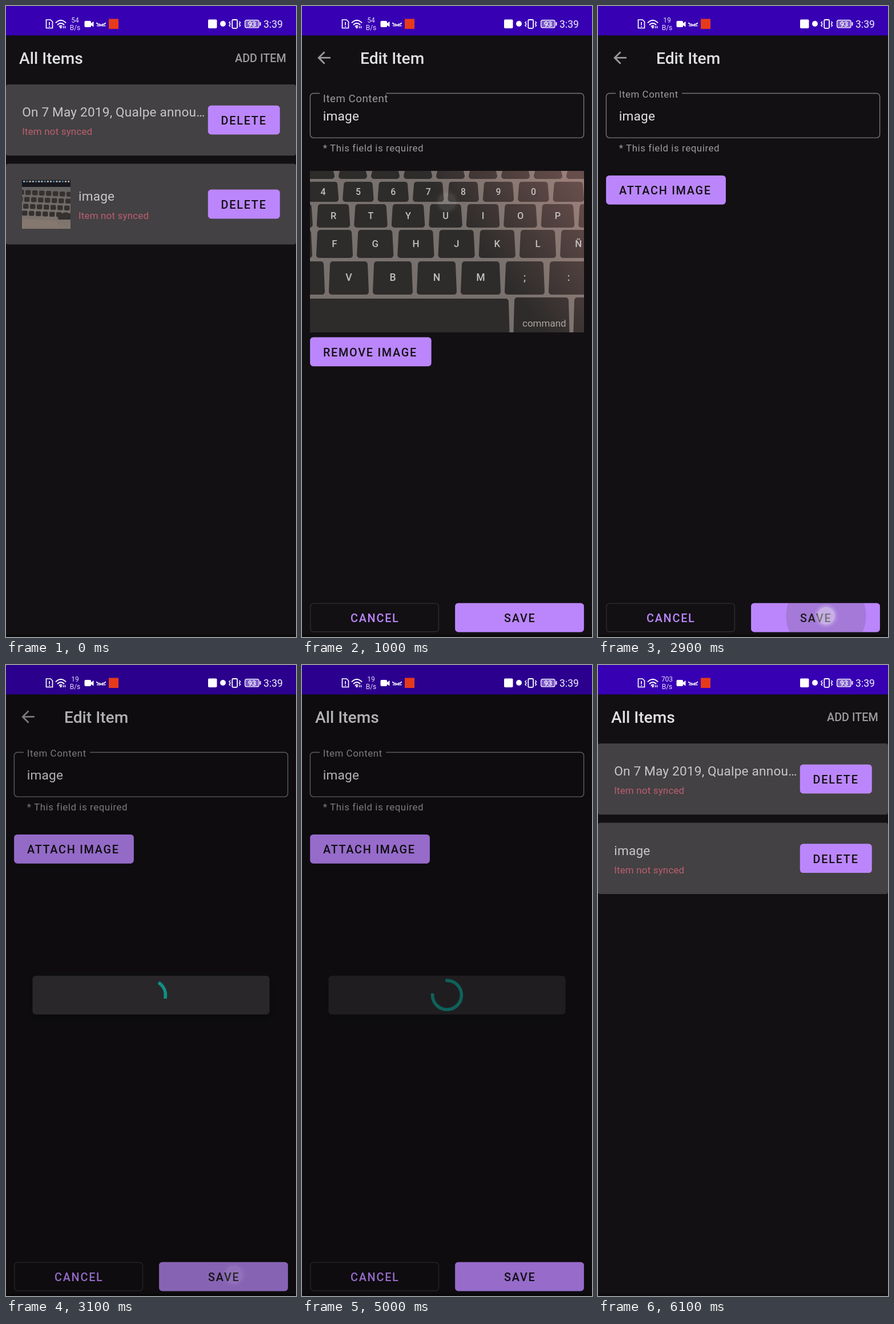
Recreate the animation shown at these times as an HTML page. Size 508 by 1102 pixels, loop 6.4 s.

```html
<!DOCTYPE html>
<html lang="en">
<head>
<meta charset="utf-8">
<title>Item list</title>
<style>
  html, body { margin: 0; width: 100%; height: 100%; overflow: hidden; background: #121013; }
  svg { display: block; width: 100%; height: 100%; }
  text { font-family: Roboto, sans-serif; white-space: pre; }
</style>
</head>
<body>
<svg id="stage" viewBox="0 0 508 1102"></svg>
<script>
const LOOP = 6400, STEP = 100;
const PURPLE = '#bb86fc', BACK = '#121013', MUTED = '#9b9a9c';

// Markup helpers
const rect = (x, y, w, h, fill, r = 0, more = '') =>
  `<rect x="${x}" y="${y}" width="${w}" height="${h}" rx="${r}" fill="${fill}" ${more}/>`;
const text = (x, y, size, fill, str, { weight = 400, gap = 0, anchor = 'start', id = '' } = {}) =>
  `<text ${id && `id="${id}"`} x="${x}" y="${y}" font-size="${size}" fill="${fill}" font-weight="${weight}"
    letter-spacing="${gap}" text-anchor="${anchor}">${str}</text>`;
const group = (id, body) => `<g id="${id}">${body}</g>`;
const line = (d, width = 1.6) => `<path d="${d}" fill="none" stroke="#fff" stroke-width="${width}"/>`;
const repeat = (n, draw) => Array.from({ length: n }, (_, i) => draw(i)).join('');
const caps = (x, y, str, fill = BACK) => text(x, y, 19.8, fill, str, { weight: 500, gap: 1.77 });
const button = (x, y, w, label, labelX = x + 22.8) =>
  rect(x, y, w, 50.8, PURPLE, 5.6) + caps(labelX, y + 33.2, label);
const title = (x, str) => text(x, 101, 28.2, '#e1e0e2', str, { weight: 500 });

const card = (y, height, label, textX, buttonY) =>
  rect(0, y, 508, height, '#434143', 4) +
  text(textX, buttonY + 19.3, 22.6, '#c8c7c8', label, { gap: 0.2 }) +
  text(textX, buttonY + 51.3, 16.9, '#bd5f70', 'Item not synced', { gap: 0.2 }) +
  button(353.8, buttonY, 126, 'DELETE');

function thumbnail() {
  const keys = repeat(4, row => repeat(9, i =>
    rect(22 + i * 12 - row * 2, 321 + row * 12 + i * 0.5, 9.5, 8.5, '#343130', 2)));
  return `<g clip-path="url(#thumbClip)">` +
    rect(28, 304, 85, 85, 'url(#thumbTone)') + rect(28, 304, 85, 12, '#17181d') +
    repeat(16, i => rect(30 + i * 5.2, 305, 3.4, 3, ['#9aa8b8', '#4d7d9c', '#b4a49a'][i % 3], 1)) +
    keys + '<path d="M28 371L90 376V389H28z" fill="#85786f"/>' + rect(91, 362, 24, 11, '#343130', 2) + '</g>';
}

// Rows of a keyboard seen in perspective: top, bottom, first centre, pitch, legends
function photo() {
  const rows = [
    [284, 302, 32, 57, ''], [307, 342, 37, 61.4, '4567890'], [346, 387, 55, 65.5, 'RTYUIOP'],
    [391, 440, 57, 71.2, 'FGHJKLÑ'], [446, 504, 82, 77, 'VBNM;:']
  ];
  const key = (left, right, top, bottom) =>
    `<path d="M${left + 7} ${top + 5}H${right - 7}L${right - 5} ${bottom - 5}H${left + 5}z"
      fill="url(#keyTone)" stroke="url(#keyTone)" stroke-width="10" stroke-linejoin="round"/>`;
  const keys = rows.map(([top, bottom, first, pitch, legends]) =>
    repeat(10, i => {
      const x = first + (i - 1) * pitch, half = pitch / 2 - 3.5, legend = legends[i - 1];
      return key(x - half, x + half, top, bottom) + (legend
        ? text(x, (top + bottom) / 2 + 5, 9 + pitch / 9, '#c3c0be', legend, { weight: 500, anchor: 'middle' }) : '');
    })).join('');
  return `<g clip-path="url(#photoClip)">` + rect(14, 288, 480, 282, 'url(#photoTone)') + keys +
    key(-10, 364, 511, 590) + key(370, 469, 509, 590) + key(475, 570, 509, 590) +
    text(386, 560, 17, '#aaa5a2', 'command') + '</g>';
}

const statusIcons =
  line('M70.5 24H78L81.5 27.5V38.5H70.5z', 1.7) + line('M76 28V33.5M76 35V36.8', 1.7) +
  line('M87 29.5Q96 20.5 105 29.5M90 33Q96 27 102 33', 2) + line('M93 36Q96 33 98 35.5', 2) +
  '<circle cx="96" cy="37.5" r="1.8" fill="#fff"/>' + line('M100.5 35V39M103.5 35V39', 1.4) +
  text(121, 29, 12, '#e6dcf8', '54', { anchor: 'middle', id: 'speed' }) +
  text(121, 42, 12, '#e6dcf8', 'B/s', { anchor: 'middle' }) +
  rect(137.5, 26, 11.5, 11, '#fff', 2) + '<path d="M148 31L153.5 27V36.5L148 33z" fill="#fff"/>' +
  line('M158.5 29Q160 33 165 31.5M168 31.5Q173 33 174.5 29M159 34.5H165.5V32M168 32V34.5H174.5', 1.7) +
  rect(180, 22.5, 17, 17.5, '#e63a1c') +
  rect(354, 23.5, 15.5, 15.5, '#fff', 2) +
  '<circle cx="380" cy="31" r="5" fill="#fff"/>' +
  rect(396.3, 24, 8.8, 14.8, 'none', 1.5, 'stroke="#fff" stroke-width="1.8"') +
  line('M393 27L391 29L393 31.5L391 34L393 36M408.5 27L410.5 29L408.5 31.5L410.5 34L408.5 36', 1.5) +
  rect(418.6, 24.7, 24.5, 13.2, '#7d5acb', 3, 'stroke="#fff" stroke-width="1.2"') +
  rect(444.5, 28, 2, 6.5, '#fff', 1) +
  text(431, 36, 12.5, '#fff', '93', { weight: 500, anchor: 'middle' }) +
  text(451, 38, 17.6, '#f3eefc', '3:39');

const listScreen = rect(0, 51, 508, 1051, BACK) +
  card(136.9, 124.4, 'On 7 May 2019, Qualpe annou…', 28.2, 173.7) +
  group('pictureCard', card(275.5, 141.1, 'image', 127, 320.6) + thumbnail()) +
  group('plainCard', card(275.5, 124.4, 'image', 28.2, 312.3));

const editScreen = rect(0, 51, 508, 1051, BACK) +
  `<path d="M147 152.5H488a5.6 5.6 0 0 1 5.6 5.6V224.5a5.6 5.6 0 0 1-5.6 5.6H20a5.6 5.6 0 0 1-5.6-5.6
    V158.1a5.6 5.6 0 0 1 5.6-5.6H31" fill="none" stroke="#777578" stroke-width="1.4"/>` +
  text(36.8, 160, 16.9, MUTED, 'Item Content', { gap: 0.55, id: 'label' }) +
  text(36.8, 200, 22.6, '#e2e1e3', 'image', { gap: 0.2 }) +
  text(36.8, 254, 16.9, MUTED, '* This field is required', { gap: 0.56 }) +
  group('withPhoto', photo() + button(14.1, 578.4, 212.5, 'REMOVE IMAGE')) +
  group('withoutPhoto', button(14.1, 295.9, 209.8, 'ATTACH IMAGE')) +
  rect(14.8, 1043.4, 224.6, 49.4, 'none', 5.6, 'stroke="#2f2d30" stroke-width="1.4"') +
  caps(85, 1076, 'CANCEL', PURPLE) + button(268.1, 1042.7, 225.8, 'SAVE', 354);

const clip = (id, x, y, w, h, r = 0) => `<clipPath id="${id}">${rect(x, y, w, h, '#000', r)}</clipPath>`;
const tone = (id, from, to) => `<linearGradient id="${id}" gradientUnits="userSpaceOnUse" x1="110" y1="570" x2="470" y2="290">
  <stop stop-color="${from}"/><stop offset=".55" stop-color="${from}"/><stop offset="1" stop-color="${to}"/></linearGradient>`;

stage.innerHTML = `<defs>
  ${clip('thumbClip', 28, 304, 85, 85)}${clip('photoClip', 14, 288, 480, 282)}
  ${clip('cardClip', 0, 275.5, 508, 141.1, 4)}${clip('removeClip', 14.1, 578.4, 212.5, 50.8, 5.6)}
  ${clip('saveClip', 268.1, 1042.7, 225.8, 50.8, 5.6)}
  ${tone('photoTone', '#77706c', '#9b7f79')}${tone('keyTone', '#2e2c2b', '#674e4b')}
  <linearGradient id="thumbTone" x2="0" y2="1"><stop stop-color="#5f5d5d"/><stop offset="1" stop-color="#837870"/></linearGradient>
  <radialGradient id="touchTone"><stop stop-color="#fff" stop-opacity=".37"/><stop offset=".66" stop-color="#fff" stop-opacity=".41"/>
    <stop offset=".73" stop-color="#fff" stop-opacity=".2"/><stop offset="1" stop-color="#fff" stop-opacity="0"/></radialGradient>
  <filter id="shadow" x="-10%" y="-50%" width="120%" height="220%"><feDropShadow dx="0" dy="8" stdDeviation="9" flood-opacity=".45"/></filter>
  </defs>` +
  group('list', listScreen) + group('edit', editScreen) +
  group('rippleClip', '<circle id="ripple"/>') +
  rect(0, 51, 508, 84, BACK) +
  group('listTitle', title(23, 'All Items')) +
  group('addItem', text(401, 98, 19.8, MUTED, 'ADD ITEM', { weight: 500 })) +
  group('editTitle', title(102, 'Edit Item') +
    `<path transform="translate(21.6 73.5) scale(1.411)" fill="${MUTED}"
      d="M20 11H7.83l5.59-5.59L12 4l-8 8 8 8 1.41-1.41L7.83 13H20z"/>`) +
  rect(0, 0, 508, 51.4, '#3700b3') +
  rect(0, 1098, 508, 4, '#0b0a0c') +
  rect(0, 0, 508, 1102, '#000', 0, 'id="scrim"') +
  group('dialog', rect(46.5, 542.8, 415, 67.4, '#373638', 5.6, 'filter="url(#shadow)"') +
    `<circle id="spinner" cx="254" cy="576.4" r="25.4" pathLength="360" fill="none"
      stroke="#0fd3bf" stroke-width="5.64" stroke-linecap="square"/>`) +
  statusIcons + '<circle id="touch" r="22" fill="url(#touchTone)"/>';

// Motion helpers
const el = id => document.getElementById(id);
const set = (id, attrs) => { for (const k in attrs) el(id).setAttribute(k, attrs[k]); };
const show = (id, on) => set(id, { opacity: +on });

function track(t, ...points) {
  if (t <= points[0][0]) return points[0][1];
  for (let i = 1; i < points.length; i++) {
    const [t0, v0] = points[i - 1], [t1, v1] = points[i];
    if (t < t1) return v0 + (v1 - v0) * (t - t0) / (t1 - t0);
  }
  return points.at(-1)[1];
}

// cubic-bezier(.4, 0, .2, 1)
function ease(x) {
  if (x <= 0 || x >= 1) return x <= 0 ? 0 : 1;
  let low = 0, high = 1, s;
  for (let i = 0; i < 24; i++) {
    s = (low + high) / 2;
    const at = 1.2 * s * (1 - s) ** 2 + 0.6 * s * s * (1 - s) + s ** 3;
    if (at < x) low = s; else high = s;
  }
  return 3 * s * s * (1 - s) + s ** 3;
}

const taps = [
  { down: 800, up: 900, x: 254, y: 342, clip: 'cardClip', fill: '#fff', alpha: 0.08, rippleEnd: 900 },
  { down: 1600, up: 1900, x: 144, y: 610, clip: 'removeClip', fill: '#464646', alpha: 0.2, rippleEnd: 1900 },
  { down: 2900, up: 3000, x: 399.5, y: 1065, clip: 'saveClip', fill: '#464646', alpha: 0.2, rippleEnd: 3400 }
];

function drawTap(t) {
  const tap = taps.findLast(item => t >= item.down) || taps[0];
  const { down, up, x, y } = tap;
  const pressed = t >= down;
  set('touch', { cx: x, cy: y, opacity: pressed ? track(t, [up, 1], [up + 100, 0.22], [up + 200, 0.08], [up + 300, 0]) : 0 });
  set('rippleClip', { 'clip-path': `url(#${tap.clip})` });
  set('ripple', {
    cx: x, cy: y, r: track(t, [down, 70], [down + 200, 230]), fill: tap.fill,
    opacity: pressed && t < tap.rippleEnd ? tap.alpha * track(t, [up, 1], [up + 300, 0]) : 0
  });
}

function drawSpinner(t) {
  const elapsed = Math.max(0, Math.min(t, 4900) - 2937);
  const phase = elapsed / 1333 % 1;
  const tail = 270 * ease(phase * 2 - 1), head = 270 * ease(phase * 2);
  const turn = tail + 90 * phase + elapsed * 720 / 4444 - 90;
  set('spinner', { 'stroke-dasharray': `${head - tail} 360`, transform: `rotate(${turn} 254 576.4)` });
}

function draw(t) {
  const editing = t >= 900 && t < 5000;
  const attached = t < 1900;
  show('listTitle', !editing);
  show('editTitle', editing);
  show('addItem', t < 900 || t >= 5100);
  show('pictureCard', t < 2900);
  show('plainCard', t >= 2900);
  show('withPhoto', attached);
  show('withoutPhoto', !attached);
  set('edit', { opacity: track(t, [800, 0], [1000, 1], [5000, 1], [5200, 0]) });

  const drop = track(t, [900, 1], [1000, 0.31], [1100, 0]);
  set('label', { y: 160 + 26 * drop, 'font-size': 16.9 + 5.7 * drop });

  set('scrim', { opacity: track(t, [2900, 0], [3200, 0.32], [4900, 0.32], [5000, 0.2], [5200, 0]) });
  set('dialog', { opacity: track(t, [2900, 0], [3200, 1], [4900, 1], [5000, 0.43], [5100, 0]) });
  drawSpinner(t);
  drawTap(t);
  el('speed').textContent = t < 2900 ? '54' : t < 5400 ? '19' : '703';
}

const start = performance.now();
function frame() {
  const t = (performance.now() - start) % LOOP;
  draw(Math.floor(t / STEP) * STEP);
  requestAnimationFrame(frame);
}
frame();
</script>
</body>
</html>
```
